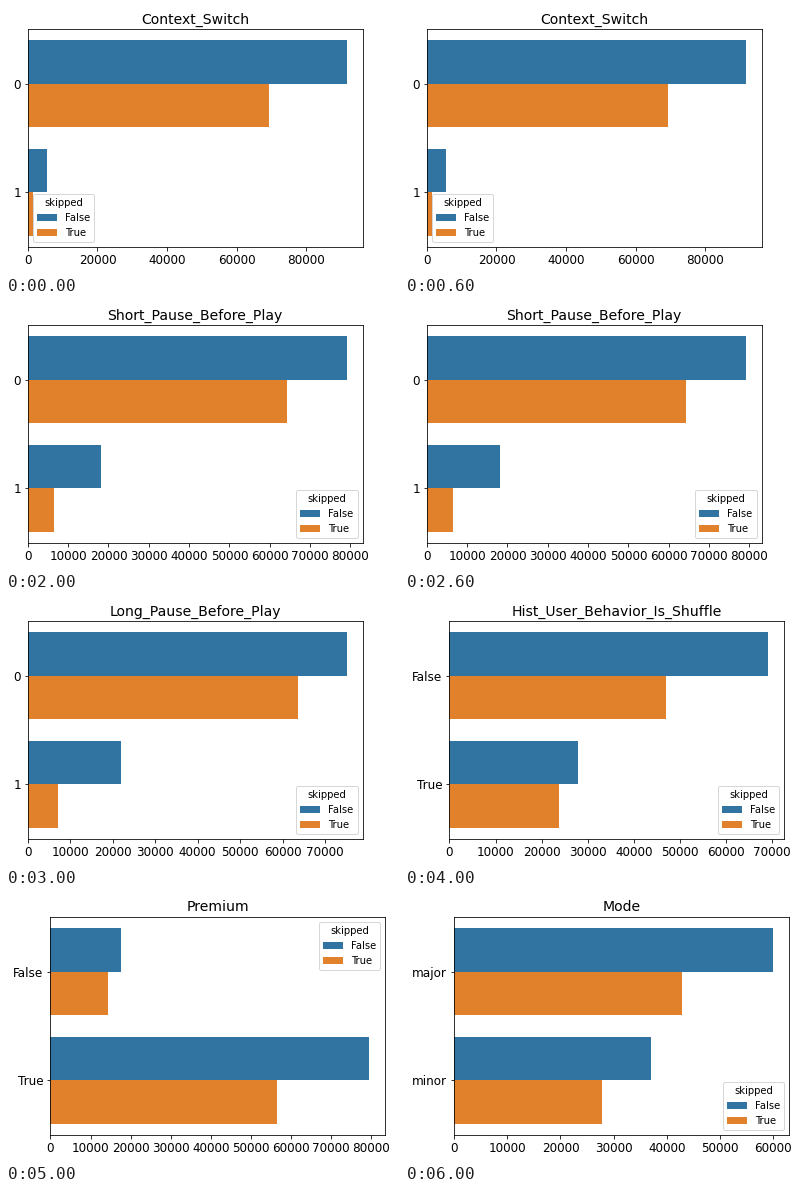
A matplotlib script for the animation above (7000 ms loop, 393 px wide and 268 px high).

```python
import matplotlib.pyplot as plt
from matplotlib.animation import FuncAnimation
from matplotlib.ticker import MultipleLocator

W, H, DPI = 393, 268, 72
AXES_W, AXES_H, BOTTOM, MARGIN = 334.8, 217.44, 27.2, 7.2
BLUE, ORANGE = "#3274a1", "#e1812c"
DIGITS, BOOLS = ("0", "1"), ("False", "True")

# title, categories, not-skipped counts, skipped counts, legend corner
CHARTS = [
    ("Context_Switch", DIGITS, (91600, 5500), (69230, 1550), "lower left"),
    ("No_Pause_Before_Play", DIGITS, (67850, 29200)[::-1], (9750, 61050), "upper right"),
    ("Short_Pause_Before_Play", DIGITS, (79100, 18100), (64300, 6500), "lower right"),
    ("Long_Pause_Before_Play", DIGITS, (75100, 21950), (63650, 7100), "lower right"),
    ("Hist_User_Behavior_Is_Shuffle", BOOLS, (69200, 27900), (47000, 23750), "lower right"),
    ("Premium", BOOLS, (17600, 79500), (14350, 56450), "upper right"),
    ("Mode", ("major", "minor"), (60000, 37100), (42900, 27850), "lower right"),
]

plt.rcParams.update({
    "font.family": "DejaVu Sans",
    "font.size": 10,
    "axes.titlesize": 14,
    "xtick.labelsize": 12,
    "ytick.labelsize": 12,
})
fig = plt.figure(figsize=(W / DPI, H / DPI), dpi=DPI, facecolor="white")


def place(ax, left):
    ax.set_position([left / W, BOTTOM / H, AXES_W / W, AXES_H / H])


def draw(i):
    title, names, kept, skipped, corner = CHARTS[i]
    fig.clear()
    ax = fig.add_subplot()
    place(ax, 50)

    rows = range(len(names))
    ax.barh([r - 0.2 for r in rows], kept, 0.4, color=BLUE, label="False")
    ax.barh([r + 0.2 for r in rows], skipped, 0.4, color=ORANGE, label="True")

    top = max(kept + skipped)
    ax.set_xlim(0, top * 1.05)
    ax.set_ylim(len(names) - 0.5, -0.5)
    ax.xaxis.set_major_locator(MultipleLocator(20000 if top > 90000 else 10000))
    ax.set_yticks(rows, names)
    ax.set_title(title)
    ax.legend(title="skipped", loc=corner)

    # keep a fixed margin left of the category labels
    place(ax, 50 + MARGIN - ax.get_tightbbox().x0)


anim = FuncAnimation(fig, draw, frames=len(CHARTS), interval=1000,
                     repeat=True, repeat_delay=0)
plt.show()
```
